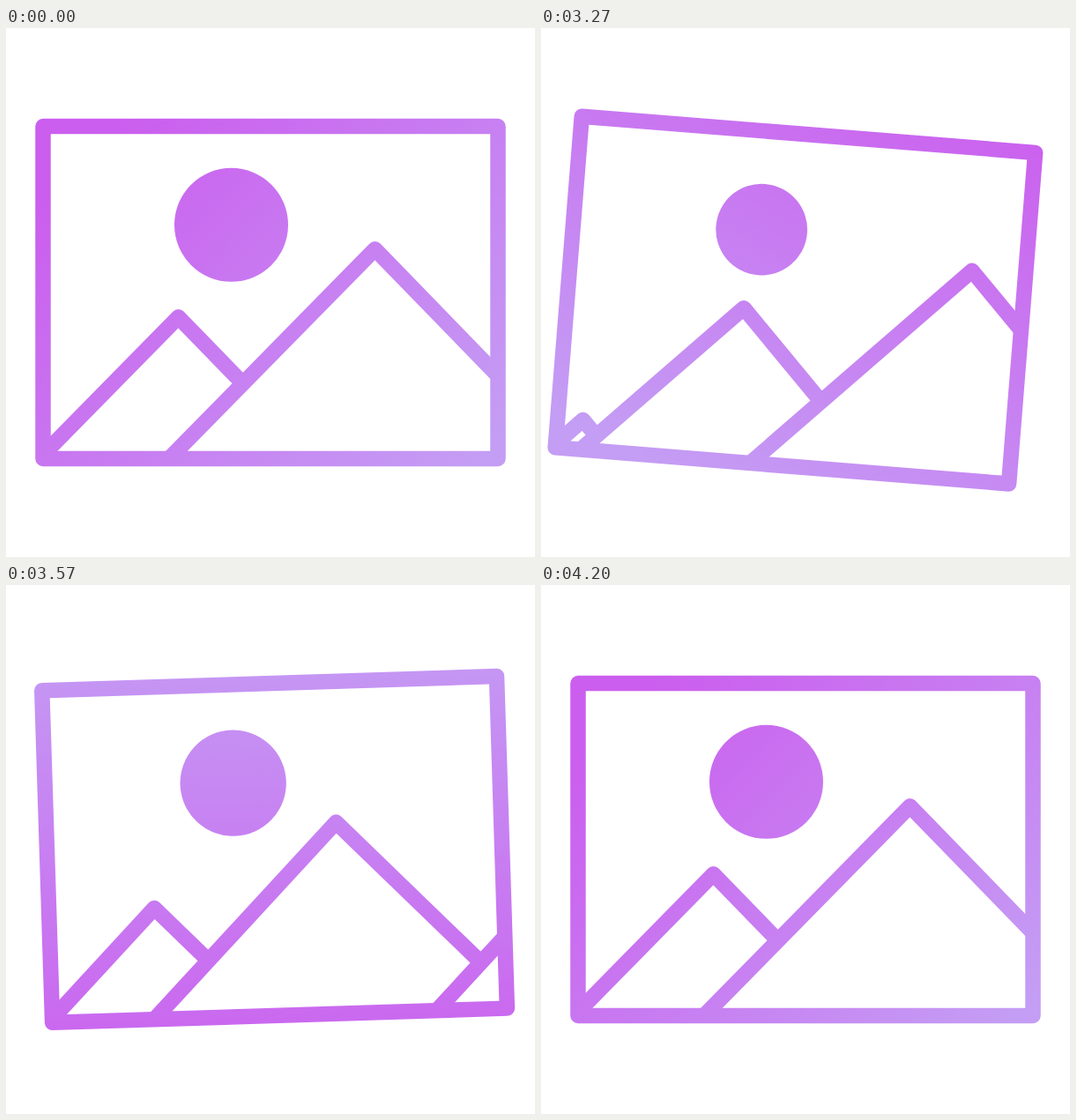
Write an HTML page that moves like this. It is 600x600 px and loops after 4.23 s.

```html
<!DOCTYPE html>
<html lang="en">
<head>
<meta charset="utf-8">
<title>Picture icon</title>
<style>
  html, body { margin: 0; width: 100%; height: 100%; overflow: hidden; background: #fff; }
  svg { display: block; width: 100vw; height: 100vh; }
</style>
</head>
<body>
<svg viewBox="0 0 600 600">
  <defs>
    <linearGradient id="tint" gradientUnits="userSpaceOnUse" x1="120" y1="120" x2="512" y2="512">
      <stop offset="0" stop-color="#cb5eee"/>
      <stop offset="1" stop-color="#c49df4"/>
    </linearGradient>
    <clipPath id="inside"><rect x="42" y="111.6" width="516" height="376.8"/></clipPath>
  </defs>
  <g id="picture" fill="none" stroke="url(#tint)" stroke-width="17.5" stroke-linejoin="round" stroke-linecap="round">
    <circle id="sun" cx="255.5" cy="223.3" r="64.5" fill="url(#tint)" stroke="none"/>
    <g clip-path="url(#inside)"><path id="hills"/></g>
    <rect x="42" y="111.6" width="516" height="376.8"/>
  </g>
</svg>
<script>
const LOOP = 4230, STEP = 30, START = 3000, END = 4200;
const BASE = 488.5, RISE = 1.018, FALL = 1.03;
const PIVOT = { x: 300, y: 155 };
const $ = id => document.getElementById(id);
const picture = $('picture'), sun = $('sun'), hills = $('hills'), tint = $('tint');

const clamp = v => Math.min(1, Math.max(0, v));
const mix = (a, b, k) => a + (b - a) * k;
const smooth = s => s * s * (3 - 2 * s);

// cubic Bezier easing with flat ends
function ease(x1, x2, x) {
  if (x <= 0 || x >= 1) return clamp(x);
  let lo = 0, hi = 1;
  for (let i = 0; i < 30; i++) {
    const s = (lo + hi) / 2, r = 1 - s;
    if (3 * r * r * s * x1 + 3 * r * s * s * x2 + s * s * s < x) lo = s; else hi = s;
  }
  return smooth(lo);
}

// smooth interpolation through [time, value] keys
function track(keys, t) {
  if (t <= keys[0][0]) return keys[0][1];
  for (let i = 1; i < keys.length; i++) {
    const [t0, a] = keys[i - 1], [t1, b] = keys[i];
    if (t < t1) return mix(a, b, smooth((t - t0) / (t1 - t0)));
  }
  return keys[keys.length - 1][1];
}

const SWING = [[3000, 0], [3100, -2], [3300, 5], [3600, -2], [3850, 1], [4200, 0]];
const DROP = [[3000, 0], [3150, 14], [3450, 0]];

// resting peaks; each hill moves on to the next place, the last one leaves
const PEAKS = [[37.6, BASE], [195.5, 327.8], [418.5, 250.8], [791.5, 250.8]];

// slide moves all hills; the middle one gains height with its own easing
function hillPath(slide, lift) {
  const tops = PEAKS.slice(0, 3).map(([x, y], i) =>
    [mix(x, PEAKS[i + 1][0], slide), mix(y, PEAKS[i + 1][1], i === 1 ? lift : slide)]);
  const foot = ([x, y]) => x - (BASE - y) / RISE;
  return tops.map((top, i) => {
    const [x, y] = top, next = tops[i + 1];
    let dy = 191;
    if (next) {
      const gap = foot(next) + (BASE - y) / RISE - x;
      dy = gap / (1 / RISE + 1 / FALL);
    }
    const pts = [[foot(top), BASE], top, [x + dy / FALL, y + dy]];
    return 'M' + pts.map(q => q.map(v => v.toFixed(2)).join(' ')).join('L');
  }).join('');
}

function draw(t) {
  const u = clamp((t - START) / (END - START));
  const angle = track(SWING, t), drop = track(DROP, t);
  picture.setAttribute('transform',
    `translate(0 ${drop}) rotate(${angle} ${PIVOT.x} ${PIVOT.y})`);

  const size = t < 3200
    ? track([[3000, 1], [3200, 0.8]], t)
    : mix(0.8, 1, ease(0.31, 0.13, (t - 3200) / 1000));
  sun.setAttribute('r', 64.5 * size);

  hills.setAttribute('d', hillPath(ease(0.4, 0.125, u), ease(0.39, 0.22, u)));
  tint.setAttribute('gradientTransform', `rotate(${360 * ease(0.3, 0.43, u)} 355 300)`);
}

const t0 = performance.now();
function tick() {
  const t = (performance.now() - t0) % LOOP;
  draw(Math.floor(t / STEP) * STEP);
  requestAnimationFrame(tick);
}
draw(0);
requestAnimationFrame(tick);
</script>
</body>
</html>
```
